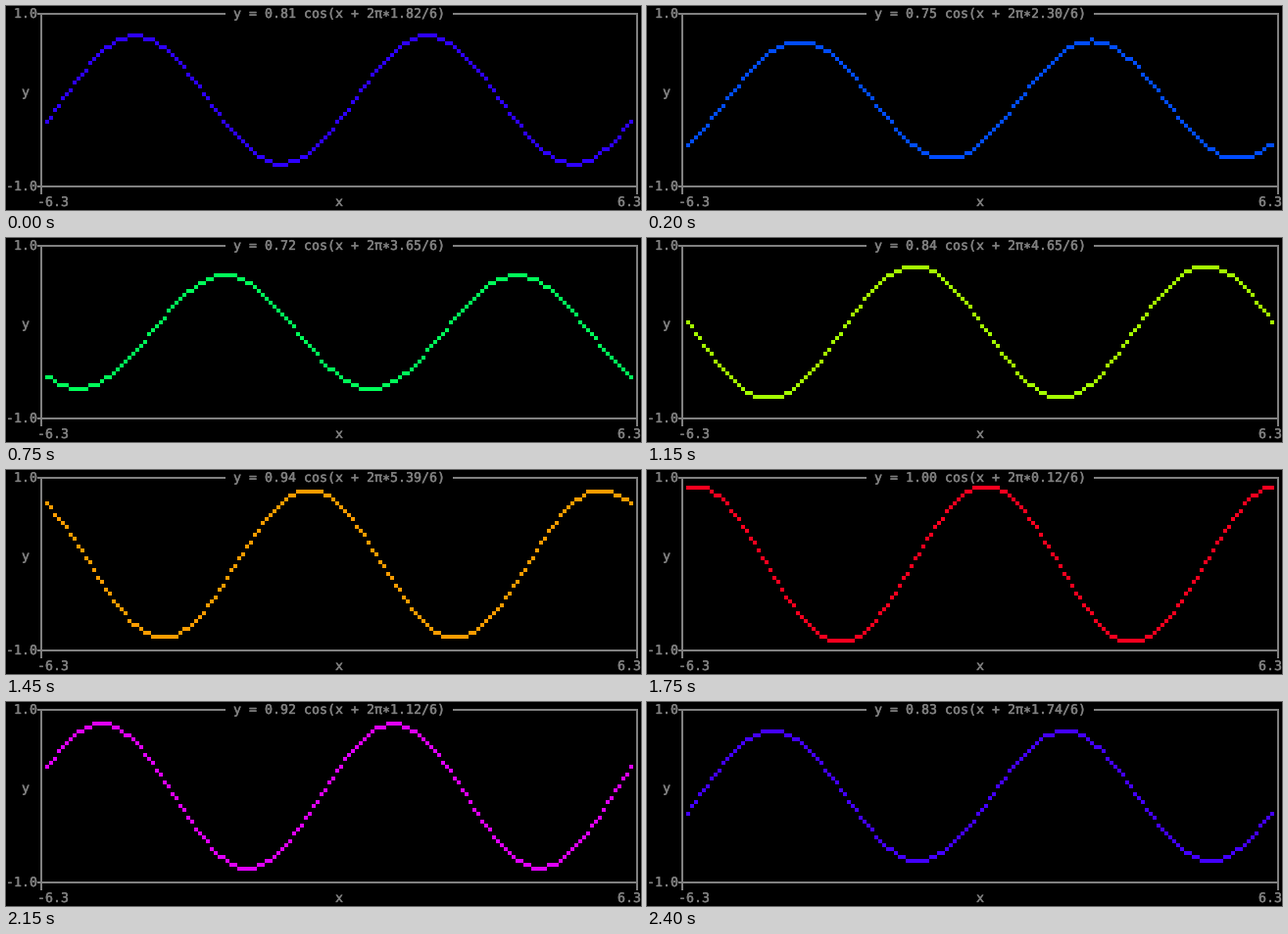
Animation, 648 px wide and 208 px high, one loop 2.45 s. Source, as a matplotlib script:

```python
import colorsys

import matplotlib.pyplot as plt
import numpy as np
from matplotlib.animation import FuncAnimation
from matplotlib.patches import Rectangle
from matplotlib.patheffects import withStroke

W, H, DPI = 648, 208, 64
CELL_W, CELL_H = 8, 16          # terminal character cell
DOT = 4                         # size of one plotted dot
COLS, ROWS = 150, 40            # dots across and down
LEFT, TOP = 40, 16              # corner of the plotting area
FRAMES, STEP_MS = 49, 50
PERIOD = 6
GREY = "#808080"
PT = 72 / DPI                   # points per pixel
FONT_PX = CELL_W / 0.602        # makes one glyph as wide as a cell

# The clock runs almost evenly; these are its readings along the loop.
KEY_FRAMES = [0, 9, 15, 23, 34, 35, 43, 48]
KEY_TIMES = [1.82, 2.90, 3.65, 4.65, 6.0, 6.12, 7.12, 7.737]

fig = plt.figure(figsize=(W / DPI, H / DPI), dpi=DPI, facecolor="black")
ax = fig.add_axes([0, 0, 1, 1])


def label(col, row, text):
    return ax.text(col * CELL_W, row * CELL_H + 12, text, color=GREY,
                   family="DejaVu Sans Mono", size=FONT_PX * PT,
                   ha="left", va="baseline", parse_math=False,
                   path_effects=[withStroke(linewidth=0.4 * PT,
                                            foreground=GREY)])


def bar(x0, y0, x1, y1):
    ax.add_patch(Rectangle((x0, y0), x1 - x0, y1 - y0, color=GREY, lw=0))


# Frame with a gap for the title and short ticks at the corners
bar(32, 7, 224, 9)
bar(456, 7, 645, 9)
bar(32, 183, 645, 185)
bar(35, 7, 37, 192)
bar(643, 7, 645, 192)

label(1, 0, "1.0")
label(0, 11, "-1.0")
label(2, 5, "y")
label(4, 12, "-6.3")
label(42, 12, "x")
label(78, 12, "6.3")
title = label(29, 0, "")

xs = np.linspace(-2 * np.pi, 2 * np.pi, COLS)
plot = ax.imshow(np.zeros((ROWS, COLS, 4)), interpolation="nearest",
                 aspect="auto",
                 extent=(LEFT, LEFT + COLS * DOT, TOP + ROWS * DOT, TOP))
ax.set_xlim(0, W)
ax.set_ylim(H, 0)
ax.axis("off")


def draw(frame):
    t = np.interp(frame, KEY_FRAMES, KEY_TIMES) % PERIOD
    amp = 0.85 + 0.15 * np.cos(t)
    ys = amp * np.cos(xs - 2 * np.pi * t / PERIOD)
    rows = np.clip((1 - ys) / 2 * ROWS, 0, ROWS - 1).astype(int)

    dots = np.zeros((ROWS, COLS, 4))
    dots[rows, np.arange(COLS)] = (*colorsys.hsv_to_rgb(1 - t / PERIOD, 1, 1), 1)
    plot.set_data(dots)
    title.set_text(f"y = {amp:.2f} cos(x + 2π∗{t:.2f}/6)")
    return plot, title


anim = FuncAnimation(fig, draw, frames=FRAMES, interval=STEP_MS,
                     repeat=True, repeat_delay=0, blit=False)
plt.show()
```
